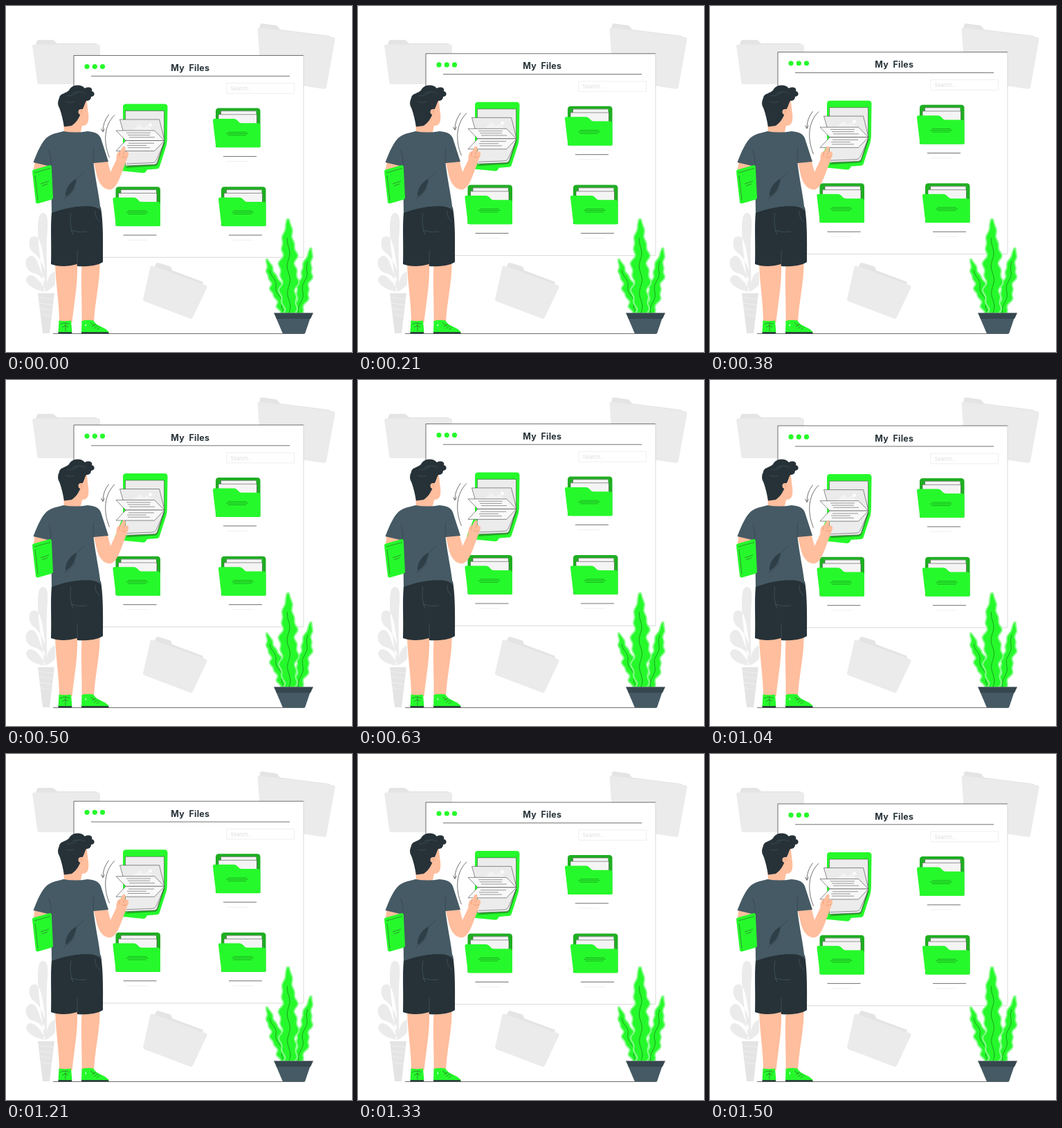
Recreate the animation shown at these times as an HTML page. Size 500x500 px, loop 1.54 s.

```html
<!DOCTYPE html>
<html lang="en">
<head>
<meta charset="utf-8">
<title>My Files</title>
<style>
html, body { margin: 0; width: 100%; height: 100%; overflow: hidden; background: #fff; }
svg { display: block; width: 100%; height: 100%; }
.g { fill: #26f92b; }
.dg { fill: #1fae22; }
.skin { fill: #ffbe9d; }
.slate { fill: #455a64; }
.ink { fill: #263238; }
.l1 { fill: #ebebeb; }
.l2 { fill: #e4e4e4; }
.page { fill: #f8f8f8; stroke: #333; stroke-width: .55; }
.ln { fill: none; stroke: #333; stroke-width: .7; }
.thin { fill: none; stroke: #333; stroke-width: .5; }
.pale { fill: none; stroke: #ebebeb; stroke-width: .8; }
text { font-family: Inter, Arial, sans-serif; }
</style>
</head>
<body>
<svg viewBox="0 0 500 500">
  <defs>
    <g id="folder">
      <path class="dg" d="M303 204V152q0-4.500 4.500-4.500H363q4.500 0 4.500 4.500V204z"/>
      <path fill="#f4f4f4" d="M310.500 151.500H361.500V175H310.500z"/>
      <path class="thin" d="M310.500 157V151.800H361.500"/>
      <path fill="#f4f4f4" d="M307 156.500H362.500V180H307z"/>
      <path class="thin" d="M307 164V156.800H362.500V170"/>
      <path class="g" d="M301 163H329q3 0 5 2l3.500 3.500q1 .8 3 .8H364q3.500 0 3.500 3.500V202.500q0 2-2 2H306q-2.500 0-2.800-2.500L299 166q-.2-3 2-3z"/>
      <path d="M320.500 182.300H348M318 184.500H350M320.500 186.900H347" fill="none" stroke="#15801a" stroke-width=".6"/>
      <path class="ln" d="M314 217.400H362"/>
      <path class="pale" d="M319 224.500H349"/>
    </g>
  </defs>

  <!-- backdrop -->
  <path class="l2" d="M43 57L44.500 51Q45 49 47 49H67Q69 49 70 50.500L74 54H130Q132 54 132 57V70H43z"/>
  <path class="l1" d="M40 55.500H134Q136 55.500 136 58V113H48Q45.500 113 45.200 110L38.200 58Q38 55.500 40 55.500z"/>
  <path class="l2" d="M366 36L367 27.500Q367.500 25 370 25.300L390 28Q392 28.300 393 30L396 34L467 43Q469 43.500 468.500 46L466 60L366 50z"/>
  <path class="l1" d="M366 31.500L473 45Q476 45.500 475.600 48L463 117.500Q462.300 120.300 459.500 120L372 106.500Q369 106 368.500 103L363.600 34Q363.500 31 366 31.500z"/>
  <path class="l2" d="M214 378L217 372.500Q218 370.500 220.500 371.300L236.500 376Q238.500 376.600 239 378.500L240 382L283 398Q285.500 399 284.500 401.500L280 412z"/>
  <path class="l1" d="M211.500 375.500L289 403.500Q291.500 404.500 290.300 407L270 450Q268.800 452.800 266 451.700L200 426.700Q197.500 425.700 198.200 423L208.500 377.500Q209.200 374.700 211.500 375.500z"/>
  <path class="l1" d="M54 299C63 300 60 320 59 338C58 368 60 386 59 412H55C53 384 46 350 46 322C46 306 48 299 54 299zM56 394C48 384 47 362 37 361C25 362 26 383 40 386C48 388 52 392 56 400zM56 376C53 356 51 335 42 333C31 332 32 348 38 355C45 361 51 365 56 382zM57 411C50 397 38 384 31 391C24 398 38 411 57 413zM58 411C59 399 61 386 71 384V402C68 407 62 410 58 413z"/>
  <path class="l2" d="M46 415H70L63 473H53z"/>
  <path d="M47 421L69 424M48 429L68 432M49 437L67 440M50 445L66 448" fill="none" stroke="#f2f2f2" stroke-width=".8"/>
  <path class="ln" d="M68 473.500H431"/>

  <g id="win">
    <path fill="#fff" d="M98 71.500H430V363.300H98z"/>
    <path class="ln" d="M98 200V71.500H430"/>
    <path d="M430 71.500V363.300H98" fill="none" stroke="#d0d0d0" stroke-width=".8"/>
    <path class="ln" d="M123 101.300H410"/>
    <g class="g"><circle cx="117" cy="87.600" r="3.600"/><circle cx="128.300" cy="87.600" r="3.600"/><circle cx="139.500" cy="87.600" r="3.600"/></g>
    <text class="ink" x="266.300" y="94" text-anchor="middle" font-size="12.500" font-weight="700" letter-spacing=".25">My&nbsp; Files</text>
    <path class="pale" d="M318.800 111.500H416.500V126.300H318.800z"/>
    <text x="324.500" y="122" font-size="7.500" fill="#dcdcdc">Search...</text>
    <use href="#folder"/>
    <use href="#folder" x="-144.500" y="113.700"/>
    <use href="#folder" x="8" y="113.700"/>

    <!-- open folder -->
    <path class="g" d="M173.500 141.500H229Q233.500 141.500 233.500 146L232.800 194Q232.500 199 231 204L222 232Q221 235.500 217.500 235.500L204 236.500L202 239.500Q201 241.500 198 241.300L160 237.500Q156 237 157.500 233L169 204V146Q169 141.500 173.500 141.500z"/>
    <path class="dg" d="M172 234L230 196L219.500 228Q218.500 231 215 231.300z"/>
    <path d="M172.500 151.500H228.500V196L219 225Q218 229 214 229.300L172.500 231z" fill="#ececec" stroke="#333" stroke-width=".5"/>
    <path class="thin" d="M228.500 198L217 223Q215.500 226.300 212 226.500L174 228"/>
    <path class="page" style="fill:#ebebeb" d="M164.500 164H221.500L229 194H173z"/>
    <path fill="#f3f3f3" d="M184 179L193 171L199 176.500L204 173L211 179z"/>
    <circle cx="208.500" cy="172" r="2.600" fill="#fafafa"/>
    <path class="page" d="M159 180H214.500L229 194.500H173z"/>
    <path class="page" d="M173 194.500H229L214.500 209.500H159z"/>
    <path class="thin" d="M174 183.300H209M176 186.500H208M178 189.700H215M177 198.300H214M175 201.500H203M176 204.700H208"/>

    <path class="ln" d="M148.500 157Q140 168 140 181M137.500 177.500L140 182L142.500 177.500M157 157.500C142 172 140 196 149.500 219"/>
  </g>

  <g id="plant"></g>
  <path class="slate" d="M390 450H440L432 473.500H400z"/>
  <path fill="#37474f" d="M387 443.500H444L440 452H391z"/>

  <!-- person -->
  <path class="skin" d="M42 224L62 230L68 248L47 279C40 270 37 246 42 224z"/>
  <path class="skin" d="M71 372H103C104 400 99 425 95.500 457H77C77 430 72 402 71 372zM109.500 372H135.500C136 397 129 424 127 457H109.500C110 430 108 402 109.500 372z"/>
  <path class="g" d="M76.500 454.500Q85 456 94 454.500L95.500 472H75.500zM109.500 455Q118 453 126.500 454.500C130 463 145 464 149 472H109z"/>
  <path class="ink" d="M75.500 471.300H95V473.500H75.500zM109 471.300H147Q149 472 149 473.500H109z"/>
  <path class="thin" d="M78 460Q85 456 92 460M86 458V470M81 465Q85 460 90 464M122 458L128 462M124 463L130 460M127 466L133 462M131 468L136 464"/>
  <path fill="#fff" d="M114 461l2-1v3z"/>
  <path class="ink" d="M66 298C90 289 120 286 137 291C141 315 140 345 140 370C132 376 112 377 103 376L102.500 373C90 377 75 377 65 373C66 345 64 320 66 298z"/>
  <path d="M94 299C92 310 93 320 97 330M103 373V352M93 324Q106 328 117 326M129 296Q128 306 136 312" fill="none" stroke="#455a64" stroke-width=".7"/>
  <path class="skin" d="M126 222L146 221L151 240L159.500 222C159 213 162 210 165 210L168 204.500C170 201 173.500 203 172.500 206.500L172 210C177 209.500 179 213 175.500 219L170 234C164 250 160 262 152 265C142 267 134 257 131 244z"/>
  <path d="M165 210Q163 214 164 217M167 218Q171 220 175 217M172 210L169 215" fill="none" stroke="#d98b6a" stroke-width=".6"/>
  <path class="skin" d="M116 134C118 143 118 150 119 155C120 166 119 173 110 173L108 182Q96 186 84 182L83 168L95 140z"/>
  <path class="slate" d="M83 181Q100 184 118 181C128 182 134 184 137 191L148 225L126.500 227C129 250 134 270 137 296Q134 291 123 289.500C104 288 85 292 66 299L65 232L39.500 226C45 211 52 196 59 190C67 184 76 183 83 181z"/>
  <path fill="#2f3f47" d="M102 249.500C93 253 85 265 86 275.500C94 272 101 261 102 249.500z"/>
  <path d="M62 208Q66 220 65 232M126.500 227Q125 215 127 205M83 279Q94 274 100 262M102 250L113 240" fill="none" stroke="#37474f" stroke-width=".8"/>
  <path class="ink" d="M77 133C78 125 89 127 92 120C97 113 109 113 114 119C119 116 126 118 124 123C129 124 129 131 123 131C123 136 119 137 116 137C113 142 113 146 110 150C107 158 104 167 95 173L84 174.500C82 162 79 152 77 147C74 142 75 137 77 133z"/>
  <path d="M88 130Q98 130 105 124M96 126Q106 122 114 126M86 138Q92 141 98 138" fill="none" stroke="#455a64" stroke-width=".6"/>
  <circle class="skin" cx="108.500" cy="153" r="4"/>
  <path d="M107 151Q110 151 109.500 155" fill="none" stroke="#d98b6a" stroke-width=".6"/>
  <path class="g" d="M40 236.500L63 230Q65.500 229.500 65.800 232L68 277Q68 279 66 279.700L46 285.500Q43.500 286 43 283.500L38 239.500Q37.800 237 40 236.500z"/>
  <path class="thin" d="M41 241L64 234.500M42 245L46 281M50 257L62 253M52 260L60 257"/>
</svg>
<script>
const $ = id => document.getElementById(id);

// Ruffled leaf from tip to base; w is the widest half-width.
function leaf([x0, y0], [x1, y1], w, sway, waves) {
  const left = [], right = [], vein = [], N = 60;
  for (let i = 0; i <= N; i++) {
    const u = i / N, a = u * waves * 2 * Math.PI;
    const grow = Math.min(1, u * 3);
    const cx = x0 + (x1 - x0) * u + sway * Math.sin(a) * grow;
    const y = y0 + (y1 - y0) * u;
    const half = w * Math.pow(Math.sin(Math.PI * (.02 + .78 * u)), .75);
    const ruffle = .14 * w * Math.sin(2 * a) * grow;
    left.push([cx - half - ruffle, y]);
    right.unshift([cx + half - ruffle, y]);
    vein.push([cx, y]);
  }
  const d = pts => 'M' + pts.map(p => p.map(v => v.toFixed(1)).join(' ')).join('L');
  const edge = d([[x0, y0], ...left, ...right]) + 'z';
  return `<path d="${edge}" fill="#26f92b" stroke="#8dfb90" stroke-width="2"/>` +
    `<path d="${d(vein.slice(12))}" fill="none" stroke="#157a18" stroke-width=".7"/>`;
}
$('plant').innerHTML =
  leaf([377, 366], [403, 444], 8, 1.8, 3) +
  leaf([440.5, 350], [423, 444], 8.5, 1.8, 3) +
  leaf([407.500, 308], [409, 444], 12, 2, 3.5);

const LOOP = 1540, STEPS = 37, RISE = 10;
function draw(now) {
  const t = Math.max(0, now - start) % LOOP;
  const step = Math.floor((t + 4) / LOOP * STEPS) % STEPS;
  const p = (step + 1) / STEPS;
  const lift = RISE * (1 - Math.abs(1 - 2 * p));
  $('win').setAttribute('transform', `translate(0 ${(.54 - lift).toFixed(3)})`);
  requestAnimationFrame(draw);
}
const start = performance.now();
draw(start);
</script>
</body>
</html>
```
